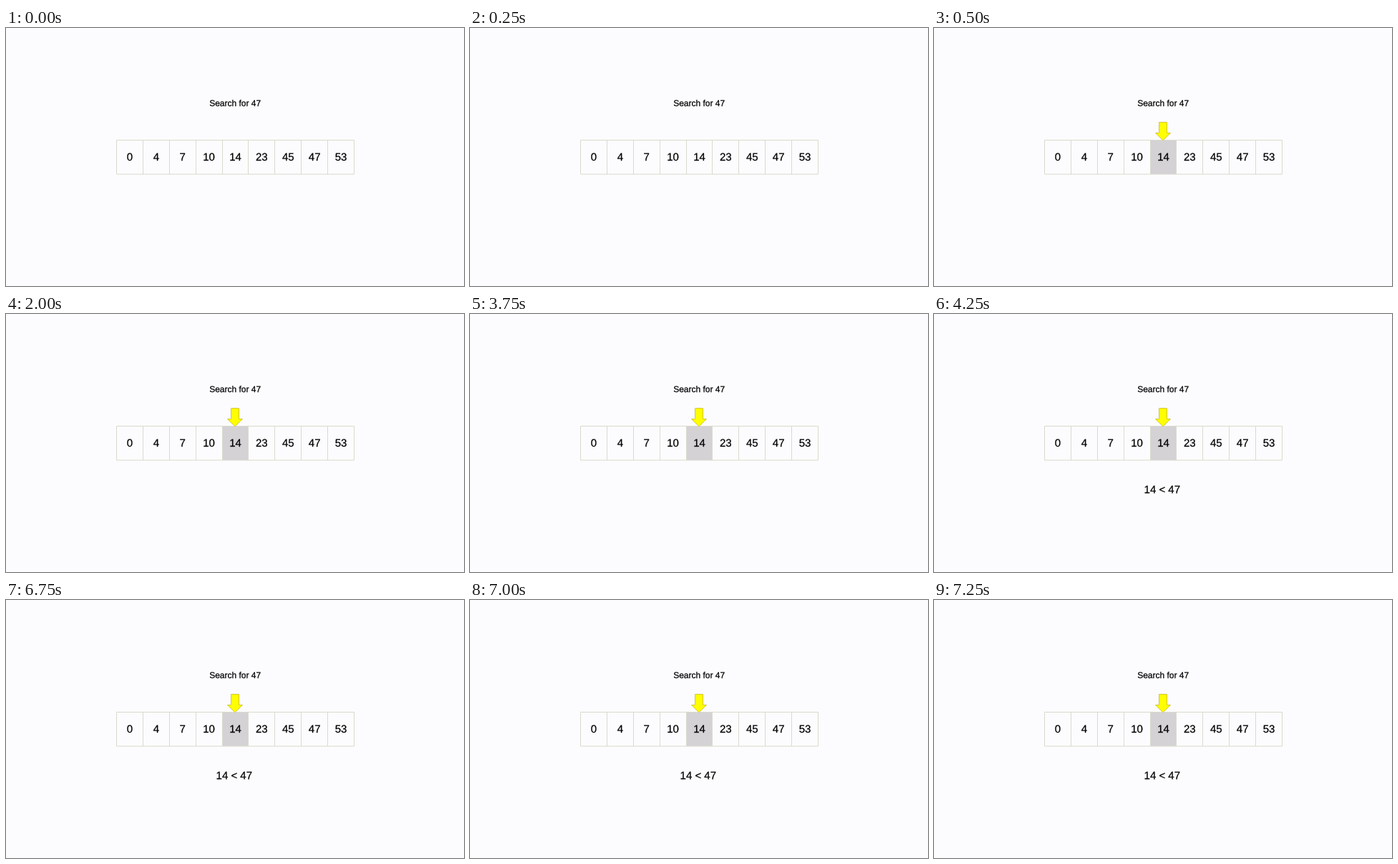
An HTML page that plays this animation: 640 px wide and 360 px high, repeating every 8 s.

```html
<!DOCTYPE html>
<html lang="en">
<head>
<meta charset="utf-8">
<title>Binary search</title>
<style>
  html, body { margin: 0; width: 100%; height: 100%; overflow: hidden; background: #fcfcfe; }
  svg { display: block; width: 640px; height: 360px; }
  text {
    font: 15px "Liberation Sans", Arial, sans-serif;
    text-anchor: middle;
    text-rendering: geometricPrecision;
    fill: #000;
    stroke: #000;
    stroke-width: 0.25;
  }
  .title { font-size: 12px; }
  .grid { fill: none; stroke: #dad9cd; stroke-width: 1; }
  .cell { fill: #d5d2d6; }
  .arrow { fill: #ff0; stroke: #d2c640; stroke-width: 1; }
  .probe { animation: probe 8s step-end infinite; }
  .compare { animation: compare 8s step-end infinite; }
  @keyframes probe { 0% { opacity: 0; } 6.25%, 100% { opacity: 1; } }
  @keyframes compare { 0% { opacity: 0; } 50%, 100% { opacity: 1; } }
</style>
</head>
<body>
<svg viewBox="0 0 640 360">
  <text class="title" x="320.2" y="109.3">Search for 47</text>
  <rect class="cell probe" x="302" y="156" width="37" height="48"/>
  <path class="grid" id="grid"/>
  <g id="values"></g>
  <path class="arrow probe" d="M314.5 131.5H325.5V146.5H330.5L320 156.8L309.5 146.5H314.5Z"/>
  <text class="compare" x="318.8" y="250.2">14 &lt; 47</text>
</svg>
<script>
  const values = [0, 4, 7, 10, 14, 23, 45, 47, 53];
  const left = 154.5, topY = 156.5, pitch = 36.89, height = 47.5;
  const edge = i => Math.floor(left + i * pitch) + 0.5;

  let path = `M${left} ${topY}H${edge(values.length)}v${height}H${left}z`;
  for (let i = 1; i < values.length; i++) path += `M${edge(i)} ${topY}v${height}`;
  document.getElementById("grid").setAttribute("d", path);

  document.getElementById("values").innerHTML = values
    .map((v, i) => `<text x="${(left + (i + 0.5) * pitch).toFixed(2)}" y="185.2">${v}</text>`)
    .join("");
</script>
</body>
</html>
```
